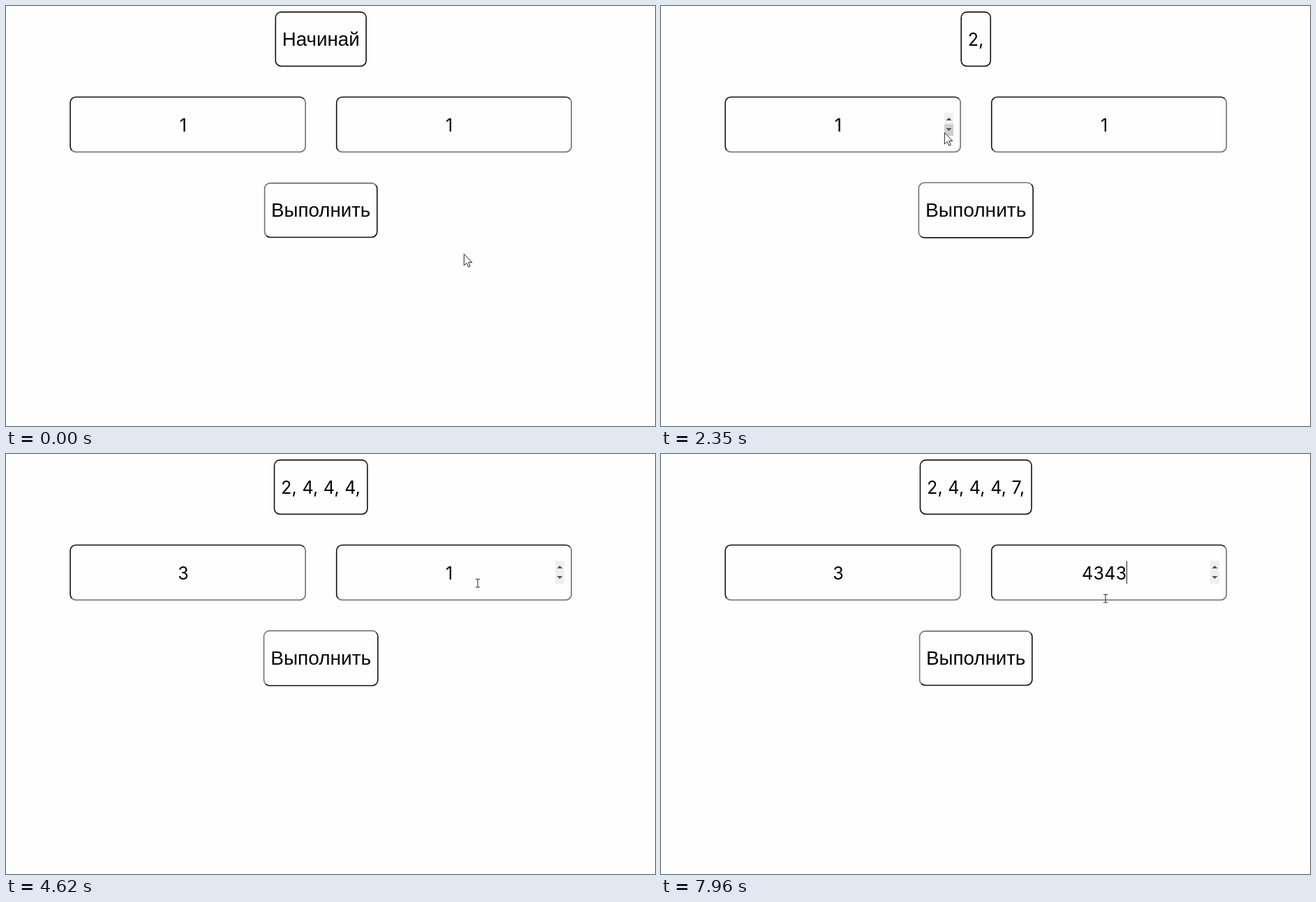
Animation of 930 by 602 pixels, one loop 8000 ms. Source, as an HTML page:

```html
<!DOCTYPE html>
<html lang="ru">
<head>
<meta charset="utf-8">
<title>Форма</title>
<style>
  html, body { margin: 0; width: 100%; height: 100%; overflow: hidden; background: #fefefe; }
  svg { display: block; width: 930px; height: 602px; }
  text { text-anchor: middle; fill: #000; }
  .word { font: 27.7px "Liberation Sans", Arial, sans-serif; }
  .num { font: 25px Inter, sans-serif; letter-spacing: .3px; }
  .box path { fill: none; stroke-width: 1.6; }
  .pointer { fill: #fff; stroke: #222; stroke-linejoin: round; }
</style>
</head>
<body>
<svg viewBox="0 0 930 602">
  <g class="box" id="result"></g>
  <text id="resultText" x="451.2"></text>
  <g class="box" id="left"></g>
  <text id="leftText" class="num" x="254" y="179.7"></text>
  <g class="box" id="right"></g>
  <text id="rightText" class="num" x="635.2" y="179.7"></text>
  <rect id="caret" y="153.5" width="1" height="32.5" fill="#222"/>
  <g id="leftSpin" transform="translate(406 153)"></g>
  <g id="rightSpin" transform="translate(787 153)"></g>
  <g id="button">
    <g class="box" id="buttonBox"></g>
    <text class="word" x="451.2" y="302.3">Выполнить</text>
  </g>
  <g class="pointer">
    <path id="arrow" d="M.3 .5V17L4.1 13.4L6.7 19.2L9.2 18.1L6.7 12.4H11.8Z"/>
    <path id="hand" d="M-1.6 1.6C-1.6-.4 1.6-.4 1.6 1.6V7.5C2 6 5 6.2 5 8C5.6 7 8.2 7.4 8.2 9C9 8.2 11 8.8 11 10.5V15C11 18 9.5 19 9 22H-1C-2 19.5-4.5 17.5-7.3 13.5C-8.3 12-6.5 10.6-5 11.8L-1.6 14.3ZM1.6 7.5V11M5 8V11.5M8.2 9V12"/>
    <path id="beam" fill="none" d="M-3-5.7H-1L0-5L1-5.7H3M0-5V5.2M-3 6H-1L0 5.2L1 6H3"/>
  </g>
</svg>
<script>
const LOOP = 8000, FADE = 500, PRESS = 60, BLINK = 530;
const DARK = '#111', PALE = '#707070';
const MID = { x: 451.2, y: 292.8 };
const $ = id => document.getElementById(id);

// Pointer moves: start, end, where to, and the point the path bends towards
const home = [656, 355];
const moves = [
  [260, 810, [281, 170], [560, -15]],
  [1060, 1640, [486, 278], [590, 300]],
  [1950, 2350, [406, 181], [470, 270]],
  [2400, 2630, [411, 164], [408, 172]],
  [3020, 3300, [468, 301], [430, 230]],
  [4200, 4620, [676, 185], [520, 270]],
  [4650, 4850, [793, 163], [735, 170]],
  [5560, 6070, [511, 281], [590, 235]],
  [6400, 7070, [667, 175], [560, 200]],
  [7720, 7960, [637, 207], [660, 205]]
];
const hovers = [[1290, 2150], [3190, 4400], [6005, 6590]];
const presses = [1700, 3610, 3770, 3930, 6270];
const leftSteps = [2860, 3010];
const rightSteps = [4950, 5080, 5320];
const typing = { from: 7720, gap: 80, keys: '343' };
const leftFocus = [[leftSteps[0], presses[1]]];
const rightFocus = [[rightSteps[0], presses[4]], [7260, LOOP]];

const during = (spans, t) => spans.some(([a, b]) => t >= a && t < b);
const count = (times, t) => times.filter(at => at <= t).length;
const clamp = p => Math.min(1, Math.max(0, p));
const smooth = p => p * p * (3 - 2 * p);
const show = (el, on) => { el.style.display = on ? '' : 'none'; };
const inside = (x, y, l, t, r, b) => x >= l && x <= r && y >= t && y <= b;

// CSS "ease": cubic-bezier(.25, .1, .25, 1)
function ease(p) {
  p = clamp(p);
  let lo = 0, hi = 1, u = p;
  for (let i = 0; i < 20; i++) {
    u = (lo + hi) / 2;
    if (.75 * u * (1 - u) + u ** 3 < p) lo = u; else hi = u;
  }
  return .3 * u * (1 - u) ** 2 + 3 * u * u * (1 - u) + u ** 3;
}

const leftValue = t => 1 + count(leftSteps, t);

function rightValue(t) {
  const typed = clamp((t - typing.from + typing.gap) / typing.gap / typing.keys.length) * typing.keys.length;
  return 1 + count(rightSteps, t) + typing.keys.slice(0, Math.floor(typed + 1e-6));
}

// Each released press appends the sum of both fields
function resultLabel(t) {
  const sums = presses.filter(at => at + PRESS <= t).map(at => leftValue(at) + Number(rightValue(at)));
  return sums.length ? sums.join(', ') + ',' : 'Начинай';
}

function pointerAt(t) {
  let from = home;
  for (const [start, end, to, bend] of moves) {
    if (t < start) break;
    const p = smooth(clamp((t - start) / (end - start))), q = 1 - p;
    from = from.map((v, i) => q * q * v + 2 * p * q * bend[i] + p * p * to[i]);
  }
  return from;
}

// Rounded frame in two halves, split at the bottom-left and top-right corners
function frame(el, x, y, w, h, topLeft, bottomRight) {
  const r = 8, k = r * (1 - Math.SQRT1_2), X = x + w, Y = y + h;
  const arc = (a, b) => `A${r} ${r} 0 0 1 ${a} ${b}`;
  const first = `M${x + k} ${Y - k}${arc(x, Y - r)}V${y + r}${arc(x + r, y)}H${X - r}${arc(X - k, y + k)}`;
  const second = `M${X - k} ${y + k}${arc(X, y + r)}V${Y - r}${arc(X - r, Y)}H${x + r}${arc(x + k, Y - k)}`;
  el.innerHTML = `<path d="${second}" stroke="${bottomRight}"/><path d="${first}" stroke="${topLeft}"/>`;
}

function makeSpin(el) {
  el.innerHTML = '<rect width="13" height="33" fill="#efefef"/>' +
    '<rect class="lit" width="13" height="16.5" fill="#cecece"/>' +
    '<path d="M2.5 11L6.5 7L10.5 11ZM2.5 22L6.5 26L10.5 22Z" fill="#505050"/>';
}

function drawSpin(el, left, x, y, on) {
  const over = inside(x, y, left - 1, 153, left + 13, 186);
  const lit = el.querySelector('.lit');
  show(el, on);
  show(lit, over);
  lit.setAttribute('y', y < 169.5 ? 0 : 16.5);
  return over;
}

function drawResult(t) {
  const label = resultLabel(t), text = $('resultText');
  const isWord = !label.endsWith(',');
  text.textContent = label;
  text.setAttribute('class', isWord ? 'word' : 'num');
  text.setAttribute('y', isWord ? 57 : 57.3);
  const width = text.getComputedTextLength() + 19;
  frame($('result'), MID.x - width / 2, 8.6, width, 77.6, DARK, DARK);
}

function drawButton(t) {
  let lift = 0;
  for (const [a, b] of hovers) lift += ease((t - a) / FADE) - ease((t - b) / FADE);
  const down = presses.some(at => t >= at && t < at + PRESS);
  $('button').setAttribute('transform',
    `translate(${MID.x} ${MID.y}) scale(${1 + .05 * lift}) translate(${-MID.x} ${-MID.y})`);
  $('button').setAttribute('opacity', 1 - .1 * lift);
  frame($('buttonBox'), 370.6, 253.9, 161.2, 77.6, down ? DARK : PALE, down ? PALE : DARK);
}

function drawPointer(t) {
  const [x, y] = pointerAt(t);
  const inLeft = inside(x, y, 91, 130, 430, 210);
  const inRight = inside(x, y, 473, 130, 811, 210);
  const overLeft = drawSpin($('leftSpin'), 406, x, y, inLeft || during(leftFocus, t));
  const overRight = drawSpin($('rightSpin'), 787, x, y, inRight || during(rightFocus, t));
  const kind = during(hovers, t) ? 'hand'
    : (inLeft || inRight) && !overLeft && !overRight ? 'beam' : 'arrow';
  for (const id of ['arrow', 'hand', 'beam']) {
    show($(id), id === kind);
    $(id).setAttribute('transform', `translate(${x} ${y})`);
  }
}

function render(t) {
  const right = $('rightText');
  $('leftText').textContent = leftValue(t);
  right.textContent = rightValue(t);
  const lit = Math.floor((t - rightSteps[0] - 80) / BLINK) % 2 === 1;
  show($('caret'), during(rightFocus, t) && lit);
  $('caret').setAttribute('x', Math.round(635.2 + right.getComputedTextLength() / 2));
  drawResult(t);
  drawButton(t);
  drawPointer(t);
}

frame($('left'), 92.1, 130.5, 337, 78.7, DARK, PALE);
frame($('right'), 473.7, 130.5, 336.5, 78.7, DARK, PALE);
makeSpin($('leftSpin'));
makeSpin($('rightSpin'));

const start = performance.now();
function tick() {
  render((performance.now() - start) % LOOP);
  requestAnimationFrame(tick);
}
tick();
</script>
</body>
</html>
```
